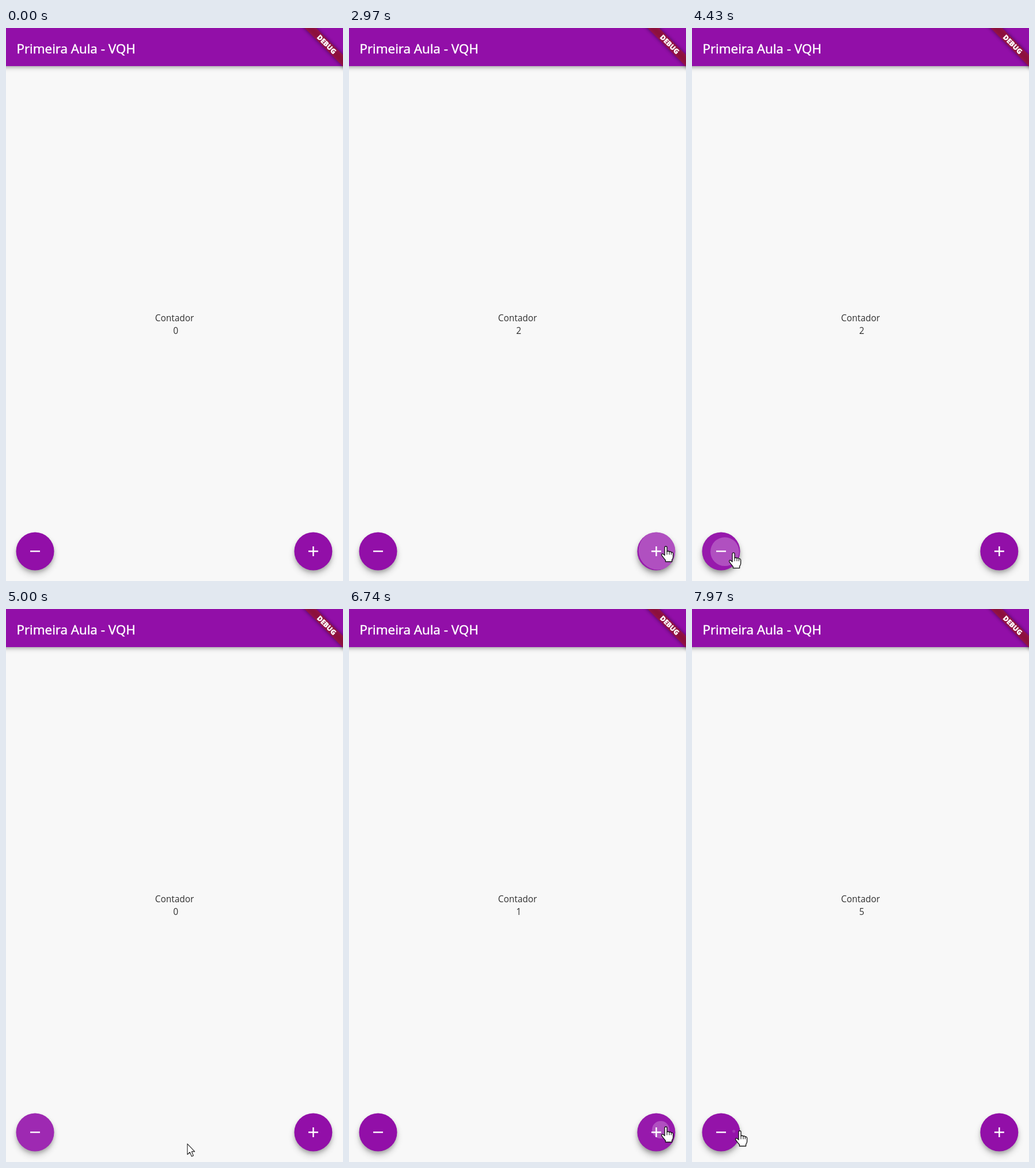
Animation, 585 px wide and 958 px high, one loop 8000 ms. Source, as an HTML page:

```html
<!DOCTYPE html>
<html lang="pt">
<head>
<meta charset="utf-8">
<title>Contador</title>
<style>
  html, body { margin: 0; width: 100%; height: 100%; overflow: hidden; background: #f8f8f8; }
  svg { display: block; width: 100vw; height: 100vh; }
  text { font-family: "Open Sans", "Noto Sans", sans-serif; }
</style>
</head>
<body>
<svg viewBox="0 0 585 958">
  <defs>
    <filter id="soft" x="-50%" y="-50%" width="200%" height="200%"><feGaussianBlur stdDeviation="3"/></filter>
    <filter id="wide" x="-50%" y="-50%" width="200%" height="200%"><feGaussianBlur stdDeviation="6"/></filter>
    <clipPath id="disc"><circle r="33"/></clipPath>
  </defs>
  <rect width="585" height="958" fill="#f8f8f8"/>

  <rect x="-20" y="10" width="625" height="58" filter="url(#soft)" opacity=".26"/>
  <rect x="-20" y="10" width="625" height="58" filter="url(#wide)" opacity=".12"/>
  <rect width="585" height="66" fill="#920fa8"/>
  <text x="18.5" y="43.5" font-size="22.4" fill="#fff" stroke="#fff" stroke-width=".5">Primeira Aula - VQH</text>

  <g transform="translate(585 0) rotate(45)">
    <rect x="-60" y="33" width="120" height="14.2" filter="url(#soft)" opacity=".5"/>
    <rect x="-60" y="33" width="120" height="14.2" fill="#b2162f" fill-opacity=".63"/>
    <text y="44.4" font-size="12" font-weight="800" fill="#fff" stroke="#fff" stroke-width=".3" text-anchor="middle">DEBUG</text>
  </g>

  <g fill="#303030" font-size="15.4" text-anchor="middle">
    <text x="292.5" y="507.5">Contador</text>
    <text id="count" x="294.7" y="529.5">0</text>
  </g>

  <g id="buttons"></g>

  <g id="arrow" fill="#fff" stroke="#222" stroke-width="1.1" stroke-linejoin="round">
    <path d="M.5 .5V19L4.8 15L7.9 22.3L10.9 21L7.9 13.9H13.2Z"/>
  </g>
  <g id="hand" fill="#fff" stroke="#111" stroke-width="1.3" stroke-linejoin="round" stroke-linecap="round">
    <path d="M-2 2Q-2 0 0 0T2 2V9Q4.2 7.4 6 9.4Q8 8.2 9.4 10.2Q12.6 9.8 12.6 13V18.5Q12.6 21 10.6 23.3V26.5H-.6V24Q-4 20-6.8 16.2Q-8.2 13.6-6.4 12.9Q-4.8 12.4-2 15.6Z"/>
    <path d="M2 9V14M6 9.6V14M9.4 10.4V14" fill="none" stroke-width="1.1"/>
  </g>
</svg>
<script>
const LOOP = 8000, RELEASE = 60;
const NS = "http://www.w3.org/2000/svg";
const $ = id => document.getElementById(id);
const clamp = v => Math.max(0, Math.min(1, v));
const mix = (a, b, k) => a + (b - a) * k;

function add(parent, tag, attrs) {
  const el = document.createElementNS(NS, tag);
  set(el, attrs);
  return parent.appendChild(el);
}
function set(el, attrs) {
  for (const k in attrs) el.setAttribute(k, attrs[k]);
}

// Pointer path: time, x, y
const path = [
  [2060, 592, 770], [2380, 550, 898], [3400, 550, 898], [3770, 134, 901],
  [3930, 72, 908], [4790, 72, 910], [5000, 314, 926], [5190, 390, 930],
  [5330, 390, 930], [5660, 78, 912], [6220, 78, 912], [6570, 550, 897],
  [7560, 550, 897], [7940, 84, 904], [8000, 82, 904]
];

const minus = {
  x: 50.5, y: 906.5, step: -1, icon: "M-8.5 0H8.5",
  clicks: [4040, 4260, 4480, 4690, 5785, 6085, 7960],
  hovers: [[3880, 4810], [5610, 6260], [7935, 8200]]
};
const plus = {
  x: 533.4, y: 906.5, step: 1, icon: "M-8.5 0H8.5M0-8.5V8.5",
  clicks: [2500, 2740, 2990, 3270, 6640, 6774, 6908, 7042, 7450],
  hovers: [[2290, 3430], [6530, 7590]]
};
const buttons = [minus, plus];

for (const b of buttons) {
  const g = add($("buttons"), "g", { transform: `translate(${b.x} ${b.y})` });
  b.lift = add(g, "circle", { r: 33, cy: 7, filter: "url(#wide)" });
  add(g, "circle", { r: 32, cy: 4, filter: "url(#soft)", opacity: .22 });
  add(g, "circle", { r: 33, fill: "#920fa8" });
  b.glow = add(g, "circle", { r: 33, fill: "#fff" });
  const inks = add(g, "g", { "clip-path": "url(#disc)", fill: "#fff" });
  b.inks = b.clicks.map(() => add(inks, "circle", {}));
  add(g, "path", { d: b.icon, stroke: "#fff", "stroke-width": 2.4 });
}

const events = buttons
  .flatMap(b => b.clicks.map(at => ({ at: at + RELEASE, step: b.step })))
  .sort((a, b) => a.at - b.at);

function pointer(t) {
  const i = path.findIndex(p => p[0] > t);
  if (i < 1) return null;
  const [t0, x0, y0] = path[i - 1], [t1, x1, y1] = path[i];
  const k = (t - t0) / (t1 - t0);
  return { x: mix(x0, x1, k), y: mix(y0, y1, k) };
}

function drawButton(b, t) {
  const hover = b.hovers.reduce((s, [from, to]) =>
    s + clamp((t - from) / 100) - clamp((t - to) / 100), 0);
  set(b.lift, { opacity: mix(.18, .25, hover) });
  set(b.glow, { opacity: .045 * hover });
  b.clicks.forEach((at, i) => {
    const age = t - at, p = clamp(age / 300);
    const pos = pointer(at), k = 1 - (.3 + .7 * p);
    const alpha = age < 0 ? 0 : .24 * clamp(.4 + age / 60) * clamp((380 - age) / 150);
    set(b.inks[i], {
      cx: (pos.x - b.x) * k, cy: (pos.y - b.y) * k,
      r: 1 + 42 * p, opacity: alpha
    });
  });
}

function draw(t) {
  let n = 0;
  for (const e of events) if (e.at <= t) n = Math.max(0, n + e.step);
  $("count").textContent = n;
  buttons.forEach(b => drawButton(b, t));

  const pos = pointer(t);
  const over = pos && buttons.some(b => Math.hypot(pos.x - b.x, pos.y - b.y) < 34.5);
  for (const id of ["arrow", "hand"]) {
    const shown = pos && over === (id === "hand");
    set($(id), { visibility: shown ? "visible" : "hidden" });
    if (shown) set($(id), { transform: `translate(${pos.x} ${pos.y})` });
  }
}

const start = performance.now();
function tick() {
  draw((performance.now() - start) % LOOP);
  requestAnimationFrame(tick);
}
draw(0);
requestAnimationFrame(tick);
</script>
</body>
</html>
```
